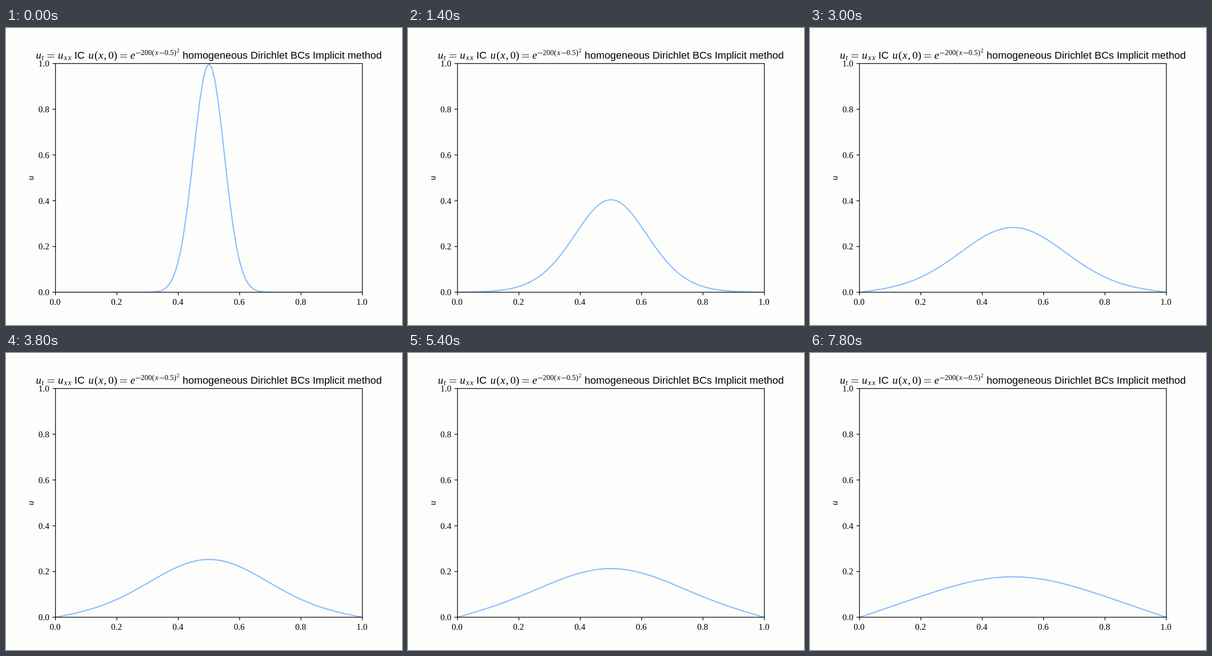
These frames come from a looping animation (864x648 px, 8 s). An HTML page with a canvas:

```html
<!DOCTYPE html>
<html lang="en">
<head>
<meta charset="utf-8">
<title>Heat equation, implicit method</title>
<style>
  html, body { margin: 0; width: 100%; height: 100%; overflow: hidden; background: #fdfdfc; }
  canvas { display: block; }
</style>
</head>
<body>
<canvas id="stage" width="864" height="648"></canvas>
<script>
const ctx = document.getElementById('stage').getContext('2d');
const SERIF = '"Liberation Serif", serif';
const SANS = '"Liberation Sans", sans-serif';
const LEFT = 108, RIGHT = 777.5, TOP = 77.5, BOTTOM = 576.5;
const STEP_MS = 200, STEPS = 40;
const CELLS = 100, DT = 0.001;

const toX = x => 108 + 669.6 * x;
const toY = u => 576.7 - 498.96 * u;

// One backward Euler step of u_t = u_xx with u = 0 at both ends (Thomas algorithm).
function implicitStep(u) {
  const r = DT * CELLS * CELLS;
  const c = [0], d = [0], next = new Array(CELLS + 1).fill(0);
  for (let i = 1; i < CELLS; i++) {
    const pivot = 1 + 2 * r + r * c[i - 1];
    c[i] = -r / pivot;
    d[i] = (u[i] + r * d[i - 1]) / pivot;
  }
  for (let i = CELLS - 1; i > 0; i--) next[i] = d[i] - c[i] * next[i + 1];
  return next;
}

const states = [Array.from({ length: CELLS + 1 }, (_, i) => Math.exp(-200 * (i / CELLS - 0.5) ** 2))];
while (states.length < STEPS) states.push(implicitStep(states[states.length - 1]));

function write(text, x, y, font, align = 'center') {
  ctx.font = font;
  ctx.textAlign = align;
  ctx.fillText(text, x, y);
}
const roman = (text, x, y, size) => write(text, x, y, `${size}px ${SERIF}`);
const italic = (text, x, y, size) => write(text, x, y, `italic ${size}px ${SERIF}`);
const sans = (text, x, y) => write(text, x, y, `22.42px ${SANS}`, 'left');
const bar = (x, y, width) => ctx.fillRect(x, y - 0.5, width, 1);

function equals(x) {
  bar(x, 58.5, 15);
  bar(x, 63.5, 15);
}

function drawTitle() {
  const base = 66.7, sub = 70, sup = 58.6, size = 23.5, small = 15.9;

  italic('u', 71, base, size);
  italic('t', 80.3, sub, small);
  equals(90.5);
  italic('u', 119, base, size);
  italic('x', 130, sub, small);
  italic('x', 139, sub, small);

  sans('IC', 149.3, base);

  italic('u', 185.7, base, size);
  roman('(', 197, base, size);
  italic('x', 207, base, size);
  roman(',', 216.5, base, size);
  roman('0', 229, base, size);
  roman(')', 239, base, size);
  equals(249);
  italic('e', 276.5, base, size);

  bar(283, 54.7, 10.5);
  roman('200', 306.2, sup, small);
  roman('(', 321.2, sup, small);
  italic('x', 328.9, sup, small);
  bar(334.7, 54.7, 10.5);
  roman('0.5', 356, sup, small);
  roman(')', 368.8, sup, small);
  roman('2', 375.4, 53.2, 12);

  sans('homogeneous Dirichlet BCs Implicit method', 385.3, base);
}

function drawAxes() {
  ctx.strokeStyle = ctx.fillStyle = '#000';
  ctx.lineWidth = 1.5;
  ctx.strokeRect(LEFT, TOP, RIGHT - LEFT, BOTTOM - TOP);
  ctx.beginPath();
  for (let k = 0; k <= 5; k++) {
    const label = (k / 5).toFixed(1);
    const x = LEFT + (RIGHT - LEFT) * k / 5;
    const y = BOTTOM + (TOP - BOTTOM) * k / 5;
    ctx.moveTo(x, BOTTOM);
    ctx.lineTo(x, BOTTOM + 6.5);
    ctx.moveTo(LEFT, y);
    ctx.lineTo(LEFT - 6.5, y);
    roman(label, x - 0.8, 603.5, 19);
    write(label, 94.6, y + 6.6, `19px ${SERIF}`, 'right');
  }
  ctx.stroke();

  ctx.save();
  ctx.translate(60, 327.3);
  ctx.rotate(-Math.PI / 2);
  italic('u', 0, 0, 19.5);
  ctx.restore();
}

function drawCurve(u) {
  ctx.save();
  ctx.beginPath();
  ctx.rect(LEFT, TOP, RIGHT - LEFT, BOTTOM - TOP);
  ctx.clip();
  ctx.beginPath();
  u.forEach((value, i) => ctx.lineTo(toX(i / CELLS), toY(value)));
  ctx.strokeStyle = '#8cc0fd';
  ctx.lineWidth = 2.7;
  ctx.lineJoin = 'round';
  ctx.stroke();
  ctx.restore();
}

function draw() {
  const step = Math.floor((performance.now() - start) / STEP_MS) % STEPS;
  ctx.fillStyle = '#fdfdfc';
  ctx.fillRect(0, 0, 864, 648);
  drawCurve(states[step]);
  drawAxes();
  drawTitle();
  requestAnimationFrame(draw);
}

const start = performance.now();
draw();
</script>
</body>
</html>
```
